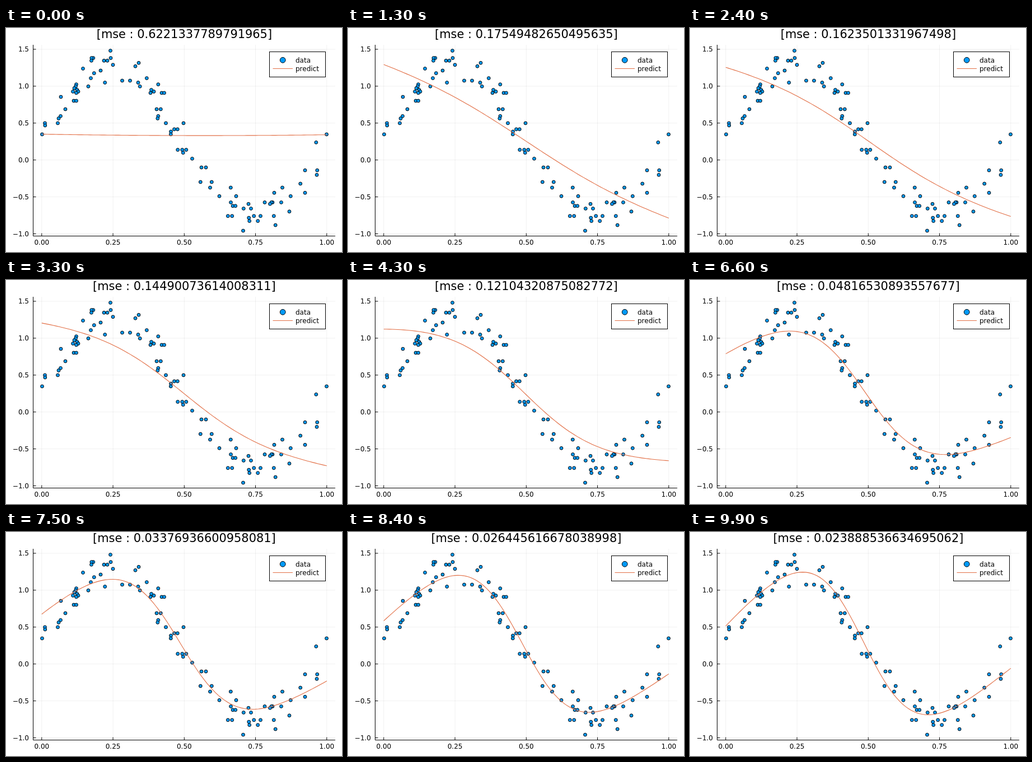
These frames come from a looping animation (600x400 px, 10000 ms). An HTML page:

```html
<!DOCTYPE html>
<html lang="en">
<head>
<meta charset="utf-8">
<title>Curve fit</title>
<style>
  html, body { margin: 0; width: 100%; height: 100%; overflow: hidden; background: #fff; }
  svg { display: block; width: 600px; height: 400px; }
  text { font: 12px "DejaVu Sans", sans-serif; }
  #title { font-size: 20.9px; text-anchor: middle; }
  .grid { stroke: #000; stroke-opacity: .06; }
  .axis { stroke: #000; fill: none; }
  .dot { fill: #009af9; stroke: #000; }
  .fit { stroke: #e26f46; stroke-width: 1.1; fill: none; }
</style>
</head>
<body>
<svg id="stage" viewBox="0 0 600 400">
  <text id="title" x="318.4" y="18.3"></text>
  <g id="frame"></g>
  <g id="dots"></g>
  <path id="curve" class="fit"/>
  <rect x="470.5" y="42.5" width="100" height="45" fill="#fff" stroke="#000"/>
  <circle class="dot" cx="494.2" cy="57.3" r="4.9"/>
  <path class="fit" d="M476.5 72.5H512"/>
  <text x="517" y="61.8">data</text>
  <text x="517" y="76.8">predict</text>
</svg>
<script>
const STEP = 100, LOOP = 10000;
const byId = id => document.getElementById(id);
const px = x => 63.8 + 509 * x;
const py = y => 235.7 - 131.8 * y;

function add(parent, tag, attrs, text = '') {
  const node = document.createElementNS('http://www.w3.org/2000/svg', tag);
  for (const name in attrs) node.setAttribute(name, attrs[name]);
  node.textContent = text;
  byId(parent).append(node);
}

// Scatter, grouped by height: [y, x, x, ...]
const rows = [
  [40.5, 186.5], [53.6, 155.8, 187, 152.8], [58.3, 152.5, 175, 181], [62.3, 237],
  [65.8, 191], [68.3, 231], [72.5, 137.5], [76, 169], [80.7, 157.3],
  [89.6, 151.5, 251.3], [94, 207.5, 221.5], [97.5, 236, 176.7], [100.7, 271.8, 125.5],
  [104.3, 124.5, 239.2, 147], [107.5, 122], [110.5, 259.5, 127],
  [113.5, 119.5, 264, 129], [115.9, 125.5, 258, 278, 282.5], [123, 98],
  [130, 121, 125.5], [145, 269, 106, 276.3], [157.3, 97.5, 271.8], [161.5, 94, 270.8],
  [169.9, 69.5, 92.5, 285.5, 317], [174, 69.8], [180.8, 306.3, 300.5], [185, 294.5],
  [189.9, 64.5, 294.3, 572.5], [204.3, 553.8], [217.5, 306.7, 314.7, 321.8],
  [222.7, 316.3], [233.3, 332.5], [249, 349, 357], [254.1, 534, 555.7], [262.3, 555],
  [275, 347.3, 367.3], [278, 525.7], [285, 364.5, 493.5, 401.3], [294.3, 479, 534],
  [300.3, 411, 381, 508.3], [311.4, 476, 491.5, 462, 474, 401.5], [314.2, 471.5, 433],
  [317.7, 405, 409.7], [322.4, 424.3, 437.5], [327.7, 506],
  [335.7, 396.3, 454.5, 403.7, 478.3, 442.7], [339, 433.7], [344.6, 449.7, 434.7],
  [352, 481.2], [362, 423.5]
];

// Fit: base + slope*s - amp*tanh(k*s) + bend*s^2, where s = x - mid
const keys = [
  { t: 0,    mse: 0.6221337789791965,   base: .331, slope: -.008, amp: 0, k: 1, bend: .06, mid: .5 },
  { t: 1300, mse: 0.17549482650495635,  base: .253, slope: -1.092, amp: .5826, k: 2.5, bend: 0, mid: .5 },
  { t: 2400, mse: 0.1623501331967498,   base: .2575, slope: -.85, amp: .661, k: 2.8, bend: -.05, mid: .5 },
  { t: 4300, mse: 0.12104320875082772,  base: .27, slope: .184, amp: 1.027, k: 3.8, bend: -.15, mid: .49 },
  { t: 6600, mse: 0.04816530893557677,  base: .288, slope: 2.2, amp: 1.697, k: 4.55, bend: -.377, mid: .4854 },
  { t: 8400, mse: 0.026445616678038998, base: .3, slope: 3.363, amp: 2.057, k: 5.12, bend: -.51, mid: .483 },
  { t: 9900, mse: 0.023888536634695062, base: .305, slope: 3.794, amp: 2.197, k: 5.25, bend: -.553, mid: .4826 }
];

function fitAt(key, x) {
  const s = x - key.mid;
  return key.base + key.slope * s - key.amp * Math.tanh(key.k * s) + key.bend * s * s;
}

// Rate of change at a key, from its neighbours after the first fast phase.
function rate(i, value) {
  const a = keys[Math.max(1, i - 1)], b = keys[Math.min(keys.length - 1, i + 1)];
  return (value(b) - value(a)) / (b.t - a.t);
}

// Value at time t; the first phase decays, the rest follows a smooth cubic.
function blend(t, value, decay) {
  if (t < keys[1].t) {
    const w = Math.exp(-t / decay);
    return value(keys[0]) * w + value(keys[1]) * (1 - w);
  }
  const i = keys.findLastIndex(key => key.t <= t);
  const a = keys[i], b = keys[i + 1];
  if (t === a.t || !b) return value(a);
  const span = b.t - a.t, u = (t - a.t) / span, v = 1 - u;
  return v * v * (1 + 2 * u) * value(a) + u * u * (3 - 2 * u) * value(b)
    + span * u * v * (v * rate(i, value) - u * rate(i + 1, value));
}

function buildFrame() {
  for (let i = 0; i <= 4; i++) {
    const x = px(i / 4);
    add('frame', 'path', { class: 'grid', d: `M${x} 30V371` });
    add('frame', 'path', { class: 'axis', d: `M${x} 371.5v-5` });
    add('frame', 'text', { x, y: 387.3, 'text-anchor': 'middle' }, (i / 4).toFixed(2));
  }
  for (let i = -2; i <= 3; i++) {
    const y = py(i / 2);
    add('frame', 'path', { class: 'grid', d: `M48 ${y}H588` });
    add('frame', 'path', { class: 'axis', d: `M48.5 ${y}h5` });
    add('frame', 'text', { x: 41, y: y + 4.4, 'text-anchor': 'end' },
      (i / 2).toFixed(1).replace('-', '\u2212'));
  }
  add('frame', 'path', { class: 'axis', d: 'M48.5 30V371.5H588' });
  for (const [cy, ...xs] of rows)
    for (const cx of xs) add('dots', 'circle', { class: 'dot', cx, cy, r: 2.9 });
}

function draw(t) {
  const points = [];
  for (let i = 0; i <= 100; i++) {
    const x = i / 100, y = blend(t, key => fitAt(key, x), 200);
    points.push(px(x).toFixed(2) + ' ' + py(y).toFixed(2));
  }
  byId('curve').setAttribute('d', 'M' + points.join('L'));
  byId('title').textContent = `[mse : ${blend(t, key => key.mse, 100)}]`;
}

const start = performance.now();
function tick() {
  const t = (performance.now() - start) % LOOP;
  draw(Math.floor(t / STEP) * STEP);
  requestAnimationFrame(tick);
}

buildFrame();
tick();
</script>
</body>
</html>
```
